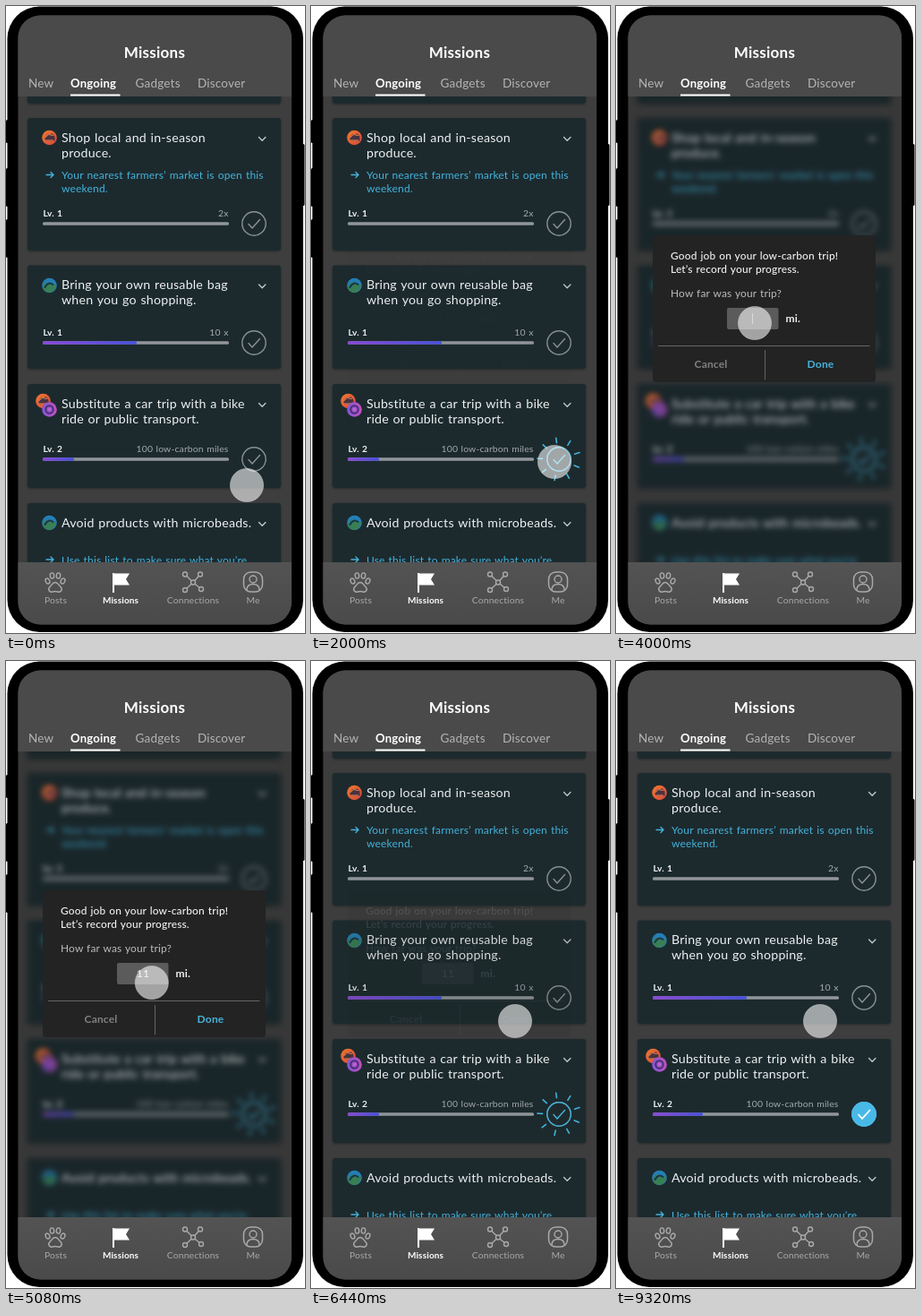
Animation of 334 by 700 pixels, one loop 9.36 s. Source, as an HTML page:

```html
<!DOCTYPE html>
<html lang="en">
<head>
<meta charset="utf-8">
<title>Missions</title>
<style>
  html, body { margin: 0; width: 100%; height: 100%; overflow: hidden; background: #fff; }
  svg { display: block; width: 100%; height: 100%; }
  text { font-family: Lato, "Open Sans", sans-serif; letter-spacing: .015em; word-spacing: .06em; white-space: pre; }
  .line { fill: none; stroke-linecap: round; stroke-linejoin: round; }
</style>
</head>
<body>
<svg id="stage" viewBox="0 0 334 700" xmlns="http://www.w3.org/2000/svg"></svg>
<script>
const LOOP = 9360;
const BLUE = '#45b3dc';
const GREY = '#a9a9a9';
const CARD = '#1f2a2e';

const text = (x, y, size, fill, str, extra = '') =>
  `<text x="${x}" y="${y}" font-size="${size}" fill="${fill}" ${extra}>${str}</text>`;
const rect = (x, y, w, h, fill, rx = 0, extra = '') =>
  `<rect x="${x}" y="${y}" width="${w}" height="${h}" rx="${rx}" fill="${fill}" ${extra}/>`;
const circle = (x, y, r, fill, extra = '') =>
  `<circle cx="${x}" cy="${y}" r="${r}" fill="${fill}" ${extra}/>`;
const line = (d, stroke, width, extra = '') =>
  `<path class="line" d="${d}" stroke="${stroke}" stroke-width="${width}" ${extra}/>`;
const BOLD = 'font-weight="700"', MID = 'text-anchor="middle"', END = 'text-anchor="end"';

const tick = (x, y) => `M${x - 6} ${y + .5}l4 4.5 8.5-9.5`;
const checkButton = y => circle(277, y, 13.2, 'none', 'stroke="#8b9193" stroke-width="1.4"') +
  line(tick(277, y), '#8b9193', 1.4);

const homeBadge = (x, y) => circle(x, y, 8.3, 'url(#orange)') +
  `<path d="M${x - 5.5} ${y + 1}l3-4.5 6-1 2.5 3.5v4.5h-9z" fill="#4a3240"/>` +
  line(`M${x - 5} ${y}l4-3.5 5 1M${x - 3} ${y + 3}h7`, '#e88a58', 1);
const earthBadge = (x, y) => circle(x, y, 8.3, '#247fb5') +
  `<path d="M${x - 7.5} ${y + 3}q2-8 7-6t8 2q-1 8-7 9-6 0-8-5z" fill="#397f56"/>` +
  line(`M${x - 5} ${y + 2}q4-7 9-3`, '#17384a', 2);
const bikeBadge = (x, y) => circle(x, y, 8.3, 'url(#violet)') +
  circle(x, y, 4.2, 'none', 'stroke="#453071" stroke-width="2"') + circle(x, y, 1.4, '#c06bd0');

function card({ y, height, badges, title, tip = [], tipY, level, amount, barY, fill = 0, id = '' }) {
  let out = rect(24, y, 283, height, CARD, 3, 'filter="url(#shadow)"') + badges;
  title.forEach((row, i) => out += text(62, y + 26.5 + i * 17, 14.2, '#eef1f1', row));
  out += line(`M282.5 ${y + 21.5}l3.7 3.7 3.7-3.7`, '#c5cacb', 1.3);
  tip.forEach((row, i) => out += text(62, tipY + i * 15, 12, BLUE, row));
  if (tip.length) out += line(`M45 ${tipY - 4.5}h8m-3-3l3 3-3 3`, BLUE, 1.3);
  if (level) {
    out += text(41.5, barY - 8, 10.2, '#f0f2f2', level, BOLD) +
      text(248.5, barY - 8, 10.4, '#a4aaac', amount, END) +
      rect(41, barY - 1.8, 208, 3.6, '#90969a', 1.5) +
      rect(41, barY - 1.8, fill, 3.6, 'url(#bar)', 1.5, id) + checkButton(barY);
  }
  return out;
}

const rays = Array.from({ length: 9 }, (_, i) => {
  const a = (i * 40 - 98) * Math.PI / 180, c = Math.cos(a), s = Math.sin(a);
  return `M${c * 18.5} ${s * 18.5}L${c * 24} ${s * 24}`;
}).join('');

const cards =
  rect(24, 80, 283, 29, CARD, 3, 'filter="url(#shadow)"') +
  card({ y: 125, height: 148, badges: homeBadge(48.5, 147), title: ['Shop local and in-season', 'produce.'],
    tip: ['Your nearest farmers’ market is open this', 'weekend.'], tipY: 193,
    level: 'Lv. 1', amount: '2x', barY: 243 }) +
  card({ y: 289.5, height: 115.5, badges: earthBadge(48.5, 312),
    title: ['Bring your own reusable bag', 'when you go shopping.'],
    level: 'Lv. 1', amount: '10 x', barY: 376, fill: 105 }) +
  card({ y: 422, height: 116, badges: homeBadge(41.5, 441) + bikeBadge(48.5, 450.5),
    title: ['Substitute a car trip with a bike', 'ride or public transport.'],
    level: 'Lv. 2', amount: '100 low-carbon miles', barY: 506, fill: 35, id: 'id="progress"' }) +
  card({ y: 555, height: 110, badges: earthBadge(48.5, 577), title: ['Avoid products with microbeads.'],
    tip: ['Use this list to make sure what you’re'], tipY: 622.5 });

const highlight =
  circle(277, 506, 16, '#fff', 'id="ripple" opacity="0"') +
  `<g id="active" opacity="0">${circle(277, 506, 13.2, CARD, `stroke="${BLUE}" stroke-width="1.5"`)}
    ${line(tick(277, 506), BLUE, 1.5)}</g>
  <g id="rays" opacity="0">${line(rays, BLUE, 1.6)}</g>
  <g id="done" opacity="0">${circle(277, 506, 13.7, '#48b9e7')}${line(tick(277, 506), '#fff', 1.8)}</g>`;

const header = rect(13, 10, 307, 91, '#4a4a4a') +
  text(166, 58, 17, '#fff', 'Missions', `${BOLD} ${MID}`) +
  text(25, 91, 13.5, '#b4b4b4', 'New') + text(72, 91, 13.1, '#fff', 'Ongoing', BOLD) +
  text(144.5, 91, 13.5, '#b4b4b4', 'Gadgets') + text(214, 91, 13.5, '#b4b4b4', 'Discover') +
  rect(72, 98.5, 55.5, 2, '#fff');

const paw = [[46.5, 642, -25], [51.5, 636, -8], [58.5, 636, 8], [63.5, 642, 25]].map(([x, y, a]) =>
  `<ellipse cx="${x}" cy="${y}" rx="2.2" ry="3.1" transform="rotate(${a} ${x} ${y})"/>`).join('') +
  '<path d="M55 643.5c-3 0-4 3-6 5-3 3 0 6.5 3 5.5q3-1 6 0c3 1 6-2.5 3-5.5-2-2-3-5-6-5z"/>';
const nodes = [[200, 634.5], [217, 634.5], [200, 652], [218, 651], [209, 643.5]];
const nav = rect(13, 621, 307, 70, 'url(#nav)') +
  `<g fill="none" stroke="${GREY}" stroke-width="1.4">${paw}</g>` +
  rect(119, 633, 2, 22, '#fff') + '<path d="M121 633.5h17l-4 6.5 4 6.5h-17z" fill="#fff"/>' +
  nodes.map(([x, y]) => line(`M209 643.5L${x} ${y}`, GREY, 1.4)).join('') +
  nodes.map(([x, y]) => circle(x, y, 2.5, '#505050', `stroke="${GREY}" stroke-width="1.4"`)).join('') +
  rect(265.5, 632, 21, 22, 'none', 8, `stroke="${GREY}" stroke-width="1.5"`) +
  circle(276, 640, 4, 'none', `stroke="${GREY}" stroke-width="1.4"`) +
  line('M269 652q0-6.5 7-6.5t7 6.5', GREY, 1.4) +
  text(55.5, 666.5, 10.3, GREY, 'Posts', MID) + text(128, 666.5, 10, '#fff', 'Missions', `${BOLD} ${MID}`) +
  text(209, 666.5, 10.3, GREY, 'Connections', MID) + text(276, 666.5, 10.3, GREY, 'Me', MID);

const dialog = rect(41, 256, 249, 164, '#232323', 4) +
  text(61, 283, 11.9, '#f2f2f2', 'Good job on your low-carbon trip!', 'font-weight="500"') +
  text(61, 298, 11.9, '#f2f2f2', 'Let’s record your progress.', 'font-weight="500"') +
  text(61, 325, 11.9, '#bcbcbc', 'How far was your trip?') +
  rect(124, 337, 57.5, 24, '#5b5b5b', 2) + rect(152, 343, 1, 12, '#a5a5a5', 0, 'id="caret"') +
  text(153, 353, 12, '#f2f2f2', '', `${MID} id="miles"`) + text(189.5, 353, 12, '#f2f2f2', 'mi.', BOLD) +
  line('M47.5 379.5H283M166.5 384.5V417', '#656565', 1) +
  text(106, 404, 12, '#808080', 'Cancel', `${BOLD} ${MID}`) + text(228.5, 404, 12, BLUE, 'Done', `${BOLD} ${MID}`);

const gradient = (id, from, to, dir = '') =>
  `<linearGradient id="${id}" ${dir}><stop stop-color="${from}"/><stop offset="1" stop-color="${to}"/></linearGradient>`;

const $ = id => document.getElementById(id);
$('stage').innerHTML = `<defs>
  ${gradient('orange', '#f07a2c', '#d9463f', 'x2="1" y2="1"')}${gradient('violet', '#8456d8', '#c34fc0')}
  ${gradient('bar', '#8b48d8', '#4650dd')}${gradient('nav', '#535353', '#4a4a4a', 'x2="0" y2="1"')}
  <filter id="shadow" x="-5%" y="-10%" width="110%" height="125%"><feDropShadow dx="0" dy="1" stdDeviation="1.8" flood-opacity=".35"/></filter>
  <clipPath id="screen"><rect x="13.5" y="10.5" width="305.5" height="680" rx="25"/></clipPath>
  <clipPath id="list"><rect x="13" y="101" width="307" height="520"/></clipPath></defs>
  ${rect(0, 127, 6, 26, '#000', 1.5)}${rect(0, 181, 6, 43, '#000', 1.5)}${rect(0, 238, 6, 43, '#000', 1.5)}
  ${rect(328, 154, 5.5, 69, '#000', 1.5)}${rect(1.5, .5, 330.5, 698.5, '#000', 36)}
  <g clip-path="url(#screen)">${rect(13, 10, 307, 681, '#3e3e3e')}
    <g clip-path="url(#list)"><g id="cards">${cards}${highlight}</g>${rect(13, 101, 307, 520, '#000', 0, 'id="dim"')}</g>
    ${header}${nav}<g id="dialog">${dialog}</g>
    ${circle(0, 0, 18.6, '#fff', 'id="cursor" fill-opacity=".58" stroke="#ccc" stroke-opacity=".5"')}
  </g>`;

const ramp = (t, start, end) => Math.min(1, Math.max(0, (t - start) / (end - start)));
const ease = p => p < .5 ? 4 * p ** 3 : 1 - (2 - 2 * p) ** 3 / 2;
const set = (id, attrs) => { for (const k in attrs) $(id).setAttribute(k, attrs[k]); };

const cursorStart = [269, 535];
const cursorMoves = [
  [300, 1250, 272, 509],
  [2700, 3580, 155, 354],
  [4860, 5600, 228, 402]
];

function cursorAt(t) {
  let [x, y] = cursorStart;
  for (const [start, end, toX, toY] of cursorMoves) {
    const p = ease(ramp(t, start, end));
    x += (toX - x) * p;
    y += (toY - y) * p;
  }
  return [x, y];
}

function draw(t) {
  const [cx, cy] = cursorAt(t);
  set('cursor', { cx, cy });

  const shown = ease(ramp(t, 1950, 2300)) * (1 - ramp(t, 6130, 6480));
  set('dialog', { opacity: shown });
  set('dim', { opacity: shown * .1 });
  $('cards').style.filter = shown > .15 ? `blur(${shown * 3.2}px)` : 'none';
  $('miles').textContent = t < 4350 ? '' : t < 4600 ? '1' : '11';
  set('caret', { opacity: t < 4350 ? 1 : 0 });

  const ripple = Math.min(ramp(t, 1250, 1400), 1 - ramp(t, 1480, 1700));
  set('ripple', { opacity: ripple * .3 });
  set('active', { opacity: ramp(t, 1650, 1800) });
  const burst = ease(ramp(t, 1700, 1950)) * (1 - ease(ramp(t, 7050, 7350)));
  set('rays', { opacity: burst, transform: `translate(277 506) scale(${.7 + .3 * burst})` });
  set('done', { opacity: ramp(t, 7150, 7400) });
  set('progress', { width: 35 + 21 * ease(ramp(t, 7720, 8450)) });
}

const begin = performance.now();
(function animate() {
  draw((performance.now() - begin) % LOOP);
  requestAnimationFrame(animate);
})();
</script>
</body>
</html>
```
